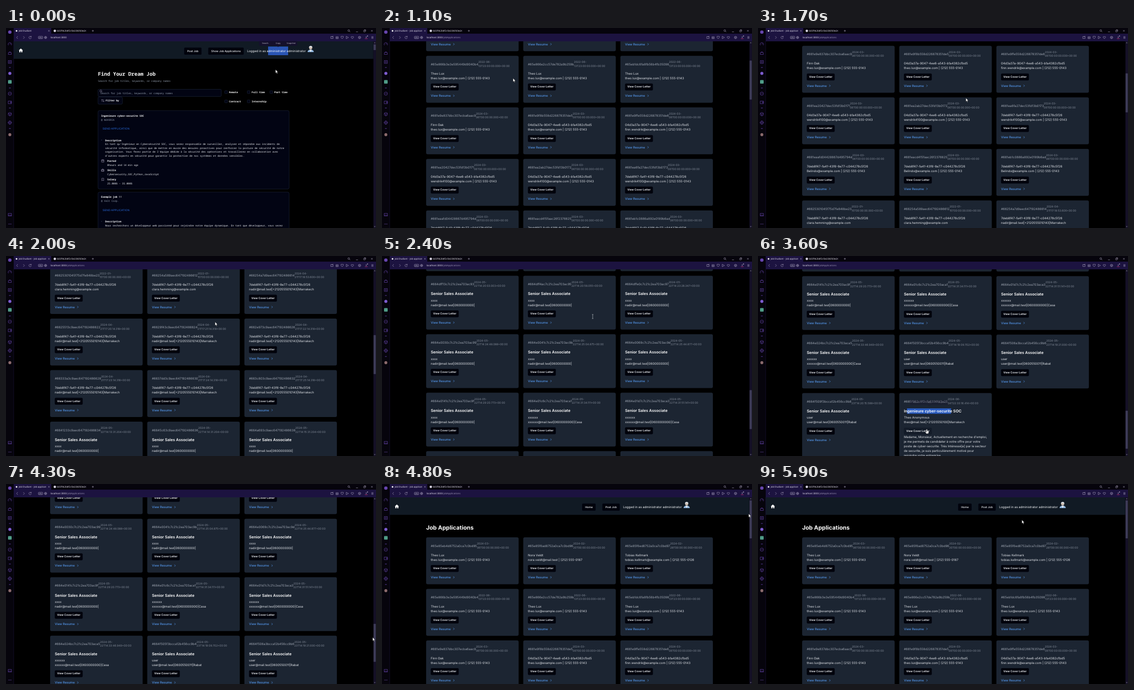
Animation, 720 px wide and 390 px high, one loop 6000 ms. Source, as an HTML page:

```html
<!DOCTYPE html>
<html lang="en">
<head>
<meta charset="utf-8">
<title>Job Etudiant</title>
<style>
html, body { margin: 0; width: 100%; height: 100%; overflow: hidden; background: #000; }
* { box-sizing: border-box; text-rendering: geometricPrecision; }
#stage { position: relative; width: 720px; height: 390px; overflow: hidden; background: #000; }
#stage > svg { position: absolute; left: 0; top: 0; }
#view { position: absolute; left: 15px; top: 26px; width: 700px; height: 364px; overflow: hidden; }
#page { position: absolute; width: 1866px; transform-origin: 0 0; font: 16px/24px Inter, sans-serif; color: #e2e5ea; white-space: nowrap; }
nav { position: absolute; left: 0; top: 0; width: 100%; height: 91px; background: #111a24; color: #f8fafc; }
nav > * { position: absolute; }
#links { right: 671px; top: 31px; display: flex; gap: 32px; }
.btn { display: inline-block; border-radius: 6px; background: #01030c; color: #f8fafc; font-size: 14px; font-weight: 500; }
#links .btn { height: 40px; line-height: 38px; padding: 0 16px; border: 1px solid #1e293b; }
#login { left: 1211px; top: 39px; }
#pick { left: 1320px; top: 27px; width: 104px; height: 45px; background: #2a55b4; }
h1 { position: absolute; left: 189px; top: 139px; margin: 0; font: 700 30px/36px Inter, sans-serif; color: #fff; }
#grid { position: absolute; left: 189px; top: 208px; width: 1488px; display: grid; grid-template-columns: repeat(3, 480px); gap: 24px; }
.card { background: #1c2532; border-radius: 8px; padding: 24px; }
.top { display: flex; align-items: center; height: 40px; margin-bottom: 16px; color: #9ea5b1; }
.top small { font-size: 14px; line-height: 20px; color: #858d9a; }
.card h2 { position: relative; z-index: 0; margin: 0 0 8px; font: 600 20px/28px Inter, sans-serif; color: #fff; }
.card .btn { margin-top: 16px; height: 36px; line-height: 36px; padding: 0 12px; font-weight: 600; vertical-align: top; }
.card .btn.hover { background: #131b28; }
.more { margin-top: 16px; color: #5599ee; font-weight: 500; display: flex; align-items: center; }
.more svg { margin-left: 8px; fill: none; stroke: currentColor; stroke-width: 2; }
#sel { position: absolute; z-index: -1; left: 16px; top: 0; height: 28px; background: #2a5cc0; }
#letter { display: none; margin-bottom: -4px; }
#list text { font: 500 4.81px "Noto Sans Mono", monospace; fill: #f1f3f6; }
#list .b { font-weight: 700; fill: #fff; }
#list .g { fill: #98a3b3; }
#list .h { font-size: 9.83px; font-weight: 700; fill: #fff; }
#list .send { font: 5.25px "Liberation Sans", Arial, sans-serif; letter-spacing: .15px; fill: #2b6fe6; }
.line { fill: #020413; stroke: #253048; stroke-width: .5; }
#ui text { font: 4.5px "Open Sans", sans-serif; fill: #f0edf7; }
#pop text, #ui .tiny { font-size: 4px; }
#ui .tiny { font-size: 3.2px; }
.ico { fill: none; stroke: #6645ad; stroke-width: .7; }
.lite { fill: none; stroke: #b9b3cc; stroke-width: .55; }
</style>
</head>
<body>
<div id="stage">
  <div id="view"><div id="page">
    <nav>
      <svg style="left:26px;top:36px" width="22" height="22" viewBox="0 0 22 22"><path fill="#fff" d="M11 1 0 11h3v10h6v-7h4v7h6V11h3z"/></svg>
      <div id="links"></div>
      <div id="pick"></div>
      <span id="login">Logged in as administrator administrator</span>
      <svg style="left:1524px;top:22px" width="34" height="36" viewBox="0 0 34 36"><path fill="#8fb4dc" d="M1 34q0-13 16-13t16 13z"/><path fill="#eef2f6" d="M11 22h12l-6 11z"/><circle cx="17" cy="12" r="8" fill="#cfc0b4"/><path fill="#d9dde2" d="M8 11q0-10 9-10t9 10q-9-6-18 0z"/></svg>
    </nav>
    <div id="apps"><h1>Job Applications</h1><div id="grid"></div></div>
  </div></div>

  <svg id="list" width="720" height="390"></svg>

  <svg id="ui" width="720" height="390">
    <path fill="#06040c" d="M0 0H720V26H15V390H0z"/>
    <path fill="#1c1340" d="M15 0H88V11H720V26H15z"/>
    <path stroke="#21164a" stroke-width=".5" d="M15 26V390"/>
    <circle cx="20.5" cy="5.6" r="1.6" fill="#fff"/>
    <text id="tab" x="24.5" y="7.4"></text>
    <circle cx="95" cy="5.6" r="2.4" fill="#d5d1df"/>
    <text x="99" y="7.4">665f962b8f2cfa6336fd3e2</text>
    <text id="url" x="86.5" y="20.3" style="font-size:4.65px">localhost:3000<tspan id="path" fill="#a29bb8">/jobApplications</tspan></text>
    <g class="lite">
      <path d="m82 4 3 3m0-3-3 3m71-3 3 3m0-3-3 3M167 5.5h4m-2-2v4M681 7.5h4M696 4.5h3v3h-3zM697 3.5h3v3M710.5 4l3 3m0-3-3 3"/>
      <circle cx="667" cy="5" r="1.7"/><path d="m668.3 6.3 1.6 1.6"/>
      <path d="m23 16-2.5 2.5L23 21M33.5 16l2.5 2.5-2.5 2.5"/>
      <path d="M49 17.2a2.4 2.4 0 1 0 .3 2M49.2 15.5v2h-2"/>
      <rect x="63" y="16.2" width="8.5" height="4.6" rx="1"/>
      <circle cx="77" cy="18.5" r="2.3"/><path d="M74.7 18.5h4.6M77 16.2v4.6"/>
      <path d="M632 16.5h4.5v4H632zM634 18l2.5-2.5M642 17h4.5v3.8H642zM652 16.2h4.4v2.5l-2.2 2.3-2.2-2.3zM662 16l4.5 2.5-4.5 2.5zM674 21l-2.2-2.3q-.6-2.2 1-2.3l1.2.9 1.2-.9q1.6.1 1 2.3z"/>
      <circle cx="644.2" cy="18.9" r=".9"/>
      <path d="m688 16 2.2 1.2v2.6L688 21l-2.2-1.2v-2.6zm0 2.5V21m0-2.5 2-1.2m-2 1.2-2-1.2M701 16v3m-1.3-1.2L701 19l1.3-1.2M711 16.8h4M711 18.5h4M711 20.2h4"/>
    </g>
    <text class="tiny" x="63.8" y="19.7">VPN</text>
    <path d="M698.5 20.8h5" stroke="#d03a7c" stroke-width=".8"/>
    <circle cx="703.5" cy="15.6" r=".9" fill="#d9d4e6"/>

    <circle cx="7.5" cy="8" r="3.3" fill="#6645ad"/>
    <g class="ico">
      <path d="M4.7 33.5a3.3 3.3 0 1 1 5.6 0M7.5 32l1.6-2M5 47.5h5l.6 4H4.4zM6.3 47.5q1.2-3 2.4 0"/>
      <path d="M4.5 63.5h6V69h-6zM6 65.5h3M6 67.2h3"/>
      <path d="M5.8 77h3.5M5.8 117h3.5M5.8 156h3.5M5.8 196h3.5" stroke-width=".9"/>
      <circle cx="7.5" cy="128" r="3.2"/><path d="m5.8 128.7 1.3-1.3 1 1 1.3-1.2"/>
      <path d="M4.3 142.5h6.4v5.2H4.3zM8.5 144.2h2.2v1.8H8.5z"/>
      <path d="m7.5 164.5 3 1.7v3.5l-3 1.7-3-1.7v-3.5zM4.5 166.2l3 1.7 3-1.7M7.5 168v3.4"/>
      <circle cx="7.5" cy="184.5" r="3.1"/><circle cx="7.5" cy="184.5" r="1.2"/><path d="M7.5 180.5v2M7.5 186.5v2M3.5 184.5h2M9.5 184.5h2"/>
      <path d="M4.3 361.5h6.4v5H4.3zM4.5 366l2-2 1.4 1.4 1-1 1.8 1.8"/>
    </g>
    <path d="M4.7 382.3h5.8" stroke="#7d5cc4" stroke-width="1.1" stroke-dasharray="1.1 1.2"/>
    <circle cx="7.5" cy="88.5" r="3" fill="#7d5cd0"/>
    <rect x="4" y="101.5" width="7" height="7" rx="1.3" fill="#4f9c87"/>
    <circle cx="7.5" cy="208" r="2.9" fill="#8a6a6c"/>

    <rect x="715" y="26" width="5" height="364" fill="#141026"/>
    <path fill="#6d6a78" d="M716 29.5l1.5-2 1.5 2zM716 386.5l1.5 2 1.5-2z"/>
    <rect id="thumb" x="715.3" width="4.2" rx=".6" fill="#3e3c58"/>

    <g id="pop">
      <rect x="-37" y="-4.5" width="74" height="9" rx="1" fill="#15102c"/>
      <path fill="#15102c" d="M-3 4.5h6L0 7z"/>
      <g text-anchor="middle" opacity=".8"><text x="-25" y="1.4">Search</text><text y="1.4">Copy</text><text x="25.5" y="1.4">Snapshot</text></g>
    </g>
    <g id="cursor">
      <path fill="#fff" stroke="#000" stroke-width=".4" d="M0 0V7L1.6 5.6 2.8 8.2 3.8 7.7 2.7 5.2H4.8z"/>
      <path fill="none" stroke="#d5d8dc" stroke-width=".6" d="M-1.3-4h2.6M0-4v8M-1.3 4h2.6"/>
      <path fill="#fff" stroke="#000" stroke-width=".4" d="M-.8 0q.8-1 1.6 0v3l2.4.8q.8.4.5 1.6L3 8.5h-4L-3 5.3q.3-1 1.4-.4l.8.8z"/>
    </g>
  </svg>
</div>

<script>
const $ = id => document.getElementById(id);
const LOOP = 6000, STEP = 100, SCALE = .375;

// ---- job applications ----
const A = '04d3a37a-9047-4ee6-a543-b1a4382cfbd5', B = '7deb8f47-fa41-43f6-8e77-c044278c5f26';
const theo = 'theo.lux@example.com | (212) 555-0143', wend = 'wendrik4100@example.com | (212) 555-0143';
const bel = 'Belindo@example.com | (212) 555-0143', clara = 'clara.hemming@example.com';
const nadir = 'nadir@mail.test|0600000000|', casa = 'xxxxxx@mail.test|0600000000|Casa', rabat = 'user@mail.test|0600550011|Rabat';
const K = 'c7c21c2ea703a', L = '3bcca12b456cc9b', M = '2024-03-06', S = '2024-05-22T14:';
const midnight = 'T00:00:00.000', june = '2022-06-13T23:00:00.000';

const cards = [
  ['65e85eb4d8752a0ca7c0bd95', M, 'Theo Lux', theo],
  ['65e85f6ad8752a0ca7c0bd96', '2024-02-20', 'Nora Veldt', 'nora.veldt@mail.test | (212) 555-0187'],
  ['65e85f6ed8752a0ca7c0bd97', '2024-02-28', 'Tobias Kellmark', 'tobias.kellmark@example.com | (212) 555-0126'],
  ['65e866b3e3e595449d9040b4', june, 'Theo Lux', theo],
  ['65e866e2cc57de782a9b259b', june, 'Theo Lux', theo],
  ['65eb1dc6fa8fb56b4fb35098', june, 'Theo Lux', theo],
  ['661e9e837dbc307ecba6aac9', M, 'Finn Oak', theo],
  ['661e9f8b558d226878351de5', M, A, theo],
  ['661e9ffe558d226878351de6', M, A, 'finn.wendrik@example.com | (212) 555-0143'],
  ['661ea20427dec53fd13b0171', M, A, wend],
  ['661ea2ab27dec53fd13b0172', M, A, wend],
  ['661ea6fa27dec53fd13b0173', M, B, wend],
  ['661eaafd04428667d495794d', M, B, bel],
  ['661eacd415faac26f2376625', M, B, bel],
  ['661eb1c0886a892e0189b6ad', M, B, bel],
  ['6625301045f75d7fe848be23', '2022-01-15', B, clara],
  ['66254a589aec647192486612', '2022-01-15', B, clara],
  ['66254a7d9aec647192486614', '2024-04-21T17:18:53.606', B, 'nadir@mail.test|+2120555010143|Marrakech']
];
for (let i = 0; i < 12; i++) {
  const id = (0x662551 + i * 0x4a3).toString(16) + '3c9aec6471924866' + (22 + i * 2);
  cards.push(i < 6 ? [id, '2024-04-21T17:2' + i + ':14.318', B, 'nadir@mail.test|+2120555010143|Marrakech']
                   : [id, S + '1' + (i - 3) + ':31.204', 'xxxx', nadir]);
}
cards.push(
  ['664dff13' + K + 'c93', S + '20:03.003', 'xxxx', nadir],
  ['664dff4a' + K + 'c95', S + '20:58.055', 'xxxx', nadir],
  ['664dffe0' + K + 'c97', S + '23:28.347', 'xxxx', nadir],
  ['664e0030' + K + 'c99', S + '24:48.088', 'xxxx', nadir],
  ['664e0041' + K + 'c9b', S + '25:04.875', 'xxxx', nadir],
  ['664e0069' + K + 'c9d', S + '25:44.877', 'xxxx', nadir],
  ['664e0141' + K + 'c9f', S + '29:20.773', 'xxxx', nadir],
  ['664e01c6' + K + 'ca1', S + '31:34.111', 'xxxxxx', casa],
  ['664e01d7' + K + 'ca3', S + '31:51.141', 'xxxxxx', casa],
  ['664e024b' + K + 'ca5', S + '33:46.949', 'xxxxxx', casa],
  ['664f505f' + L + '4', '2024-05-23T14:19:09.702', 'user', rabat],
  ['664f506a' + L + '6', '2024-05-23T14:19:21.930', 'user', rabat],
  ['664f509f' + L + '8', '2024-05-23T14:20:15.588', 'user', rabat],
  ['665f962c8f2cfa6336fd3e25', '2024-06-04T22:33:16.414', 'Theo Anonymous', 'theo@mail.test|+21205550100|Marrakech']
);

const letter = `<div id="letter">Madame, Monsieur, Actuellement en recherche d'emploi,<br>je me permets de candidater à votre offre pour votre<br>
poste de cyber-securite. Très Intéressé[e] par le secteur<br>de securite, je suis particulièrement motivé pour<br>rejoindre votre entreprise.</div>`;

$('grid').innerHTML = cards.map(([id, date, name, contact], i) => {
  const last = i === cards.length - 1;
  const stamp = (date.length > 10 ? date : date + midnight) + '+00:00';
  const title = last ? '<span id="sel"></span>Ingenieure cyber-securite SOC' : 'Senior Sales Associate';
  return `<div class="card"><div class="top">#${id}<small>${stamp.slice(0, 8)}<br>${stamp.slice(8)}</small></div>
    ${i < 24 ? '' : `<h2>${title}</h2>`}<div>${name}</div><div>${contact}</div>
    <span class="btn"${last ? ' id="open"' : ''}>View Cover Letter</span>${last ? letter : ''}
    <div class="more">View Resume<svg width="16" height="16"><path d="m6 3 5 5-5 5"/></svg></div></div>`;
}).join('');

// ---- job list; y is the middle of the text line ----
const text = (x, y, s, c = '') => `<text x="${x}" y="${y + 1.6}" class="${c}">${s}</text>`;
const box = (x, y, w, h, r = 2) => `<rect x="${x}" y="${y}" width="${w}" height="${h}" rx="${r}" class="line"/>`;
const check = (x, y, s) => box(x, y - 2.7, 5.5, 5.5, 1) + text(x + 8.5, y, s, 'b');
const glyph = d => `<path d="${d}" class="lite"/>`;
const job = (y, title, firm, lines) => text(185, y + 10, title, 'b') + text(185, y + 18, firm, 'g') +
  text(188, y + 35.7, 'SEND APPLICATION', 'send') + `<circle cx="186" cy="${y + 57.5}" r=".6" fill="#5b6b85"/>` +
  text(193, y + 58, 'Description', 'b') + lines.map((s, i) => text(193, y + 65.8 + i * 7.5, s)).join('');
const fact = (y, label, value) => text(197, y, label, 'b') + text(197, y + 7.7, value);

$('list').innerHTML = text(179, 91.6, 'Find Your Dream Job', 'h') +
  text(179, 103, 'Search for job titles, keywords, or company names', 'g') +
  box(179, 119.5, 240, 14) + text(183.5, 127, 'Search for job titles, keywords, or company names', 'g') +
  '<circle cx="184.5" cy="122.8" r="1.9" class="lite"/>' + glyph('m186 124.3 1.3 1.3') +
  box(179, 134.5, 47.5, 14) + text(194, 141.5, 'Filter by', 'b') +
  glyph('M187 144v-5l-1.3 1.3M187 139l1.3 1.3M190 139v5l-1.3-1.3M190 144l1.3-1.3') +
  check(425.5, 125, 'Remote') + check(469.5, 125, 'Full time') + check(513.5, 125, 'Part time') +
  check(425.5, 143, 'Contract') + check(469.5, 143, 'Internship') +
  box(179, 161, 372, 153, 3) +
  job(161, 'Ingenieure cyber-securite SOC', '@ NUVORIA', [
    "En tant qu'Ingénieur en Cybersécurité SOC, vous serez responsable de surveiller, analyser et répondre aux incidents de",
    'sécurité informatique, ainsi que de mettre en œuvre des mesures proactives pour renforcer la posture de sécurité de notre',
    "organisation. Vous ferez partie de l'équipe dédiée à la sécurité des opérations et travaillerez en collaboration avec",
    "d'autres experts en sécurité pour garantir la protection de nos systèmes et données sensibles."]) +
  fact(259.5, 'Posted', '0hours and 14 min ago') + fact(277.5, 'Skills', 'Cybersecurity,SOC,Python,JavaScript') +
  fact(295.5, 'Salary', '25.000$ - 35.000$') +
  glyph('M186 257h4.5v4.5H186zM186 258.7h4.5M187.3 256.2v1.2M189.2 256.2v1.2') +
  glyph('M185.7 276h5v3.5h-5zM187.3 276v-1h1.8v1M187 276v3.5M189.4 276v3.5') +
  glyph('M186.5 293h3.6v5l-1.8-1.5-1.8 1.5z') +
  box(179, 320, 372, 153, 3) +
  job(319.5, 'Exemple job !!', '@ Velt Corp.', [
    'Nous recherchons un développeur web passionné pour rejoindre notre équipe dynamique. En tant que développeur, vous serez']);

// ---- motion ----
const scrollKeys = [[0, 0], [800, 0], [1100, 401], [1700, 721], [2000, 1560], [2400, 2927], [2700, 3533], [4100, 3533], [4300, 3153], [4800, 0], [LOOP, 0]];
const cursorKeys = [[0, 524.5, 81], [300, 428, 46], [500, 428, 46], [1100, 255, 98], [1700, 404.5, 136.5], [2400, 410, 118], [2800, 408, 80],
  [3000, 240, 372], [3100, 134, 330], [3200, 290, 303], [3400, 376, 303], [3600, 328.5, 338], [3700, 328.5, 338], [4000, 713.5, 328],
  [4100, 713.5, 328], [4300, 713.5, 299], [4800, 713.5, 58], [5000, 690, 90], [5300, 130, 150], [5700, 480, 95], [5900, 513.5, 70], [LOOP, 524.5, 81]];

function sample(keys, t) {
  const i = keys.findIndex(k => k[0] > t), a = keys[i - 1], b = keys[i];
  const p = (t - a[0]) / (b[0] - a[0]);
  return a.slice(1).map((v, n) => v + (b[n + 1] - v) * p);
}
const within = (t, a, b) => t >= a && t < b;
const show = (el, on, mode = '') => { el.style.display = on ? mode : 'none'; };

function render(t) {
  const home = t < 500, opened = t >= 3600;
  const [scroll] = sample(scrollKeys, t), [x, y] = sample(cursorKeys, t);

  show($('list'), home);
  show($('apps'), !home);
  show($('path'), !home);
  $('tab').textContent = home ? 'Job Etudiant' : 'Job Etudiant - Job applicat';
  const links = (home ? ['Post Job', 'Show Job Applications'] : ['Home', 'Post Job']).map(s => `<span class="btn">${s}</span>`).join('');
  if ($('links').innerHTML !== links) $('links').innerHTML = links;
  $('page').style.transform = `scale(${SCALE}) translateY(${-scroll}px)`;

  const total = home ? 11680 : opened ? 1734 : 1689;
  $('thumb').setAttribute('y', 32 + scroll * SCALE * 353 / total);
  $('thumb').setAttribute('height', 353 * 364 / total);

  show($('pick'), t < 300);
  $('sel').style.width = within(t, 3200, 4200) ? (t < 3400 ? (x - 290) / SCALE : 229) + 'px' : 0;
  show($('letter'), opened, 'block');
  $('open').classList.toggle('hover', within(t, 3500, 3800));
  $('pop').style.opacity = t < 300 || within(t, 3400, 3600) ? 1 : t === 3600 ? .25 : 0;
  $('pop').setAttribute('transform', t < 300 ? 'translate(529.5 30)' : 'translate(333 286)');

  const beam = within(t, 2200, 2800) || within(t, 3200, 3500);
  const hand = within(t, 300, 600) || within(t, 3500, 3800);
  const shape = beam ? 1 : hand ? 2 : 0;
  [...$('cursor').children].forEach((el, i) => show(el, i === shape));
  $('cursor').setAttribute('transform', `translate(${x} ${y})`);
}

const start = performance.now();
function tick() {
  render(Math.floor((performance.now() - start) % LOOP / STEP) * STEP);
  requestAnimationFrame(tick);
}
tick();
</script>
</body>
</html>
```
